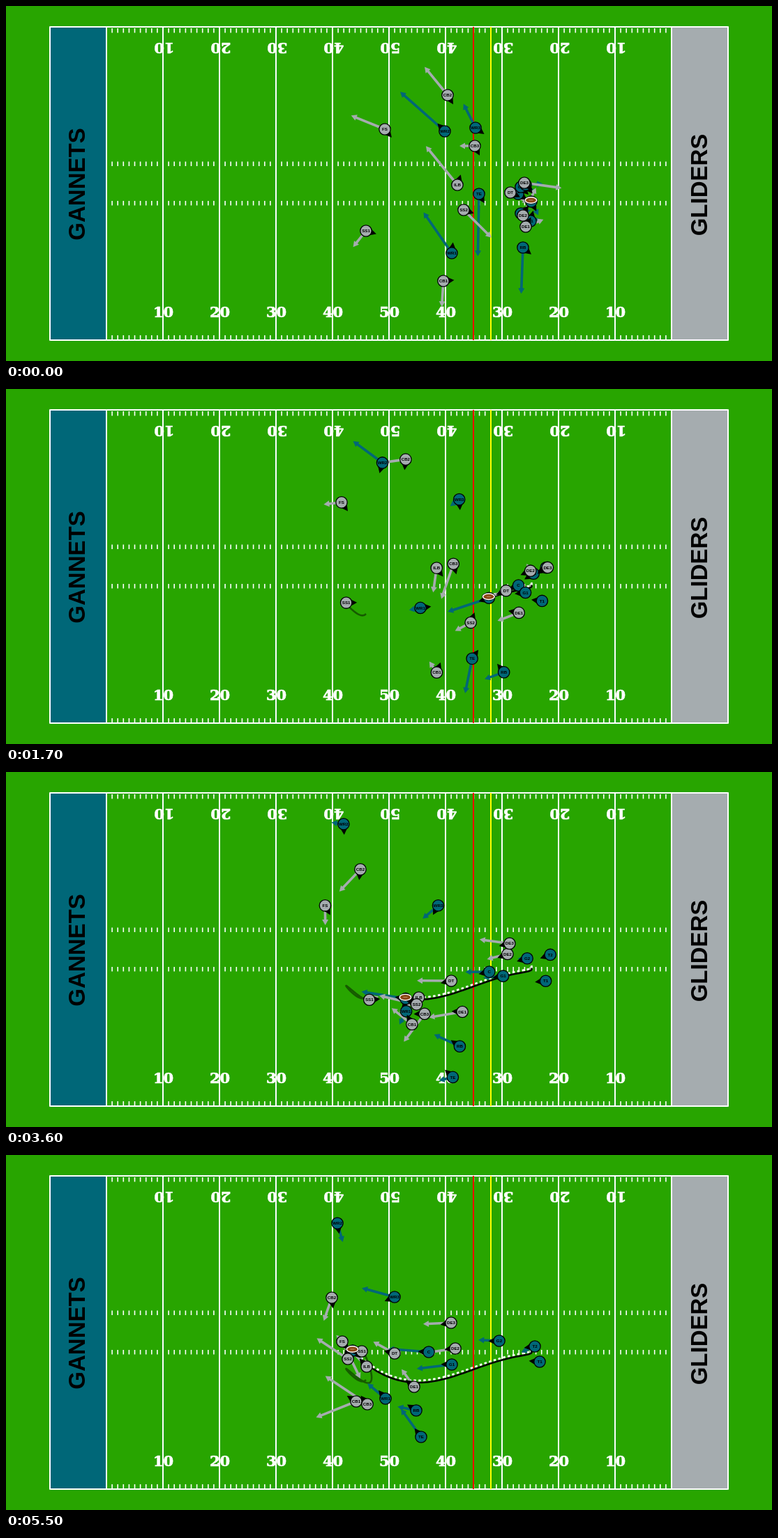
Animation, 1098 px wide and 510 px high, one loop 5600 ms. Source, as an HTML page with a canvas:

```html
<!DOCTYPE html>
<html lang="en">
<head>
<meta charset="utf-8">
<title>Football play</title>
<style>
html, body { margin: 0; height: 100%; overflow: hidden; background: #28a500 }
canvas { display: block }
</style>
</head>
<body>
<canvas id="stage" width="1098" height="510"></canvas>
<script>
const ctx = document.getElementById("stage").getContext("2d");
const LOOP = 5600, STEP = 100, PLAY = 5.5; // ms, ms, seconds
const TEAL = "#006778", SILVER = "#a5acaf", GRASS = "#28a500";
const SANS = "'Liberation Sans', Arial, sans-serif";
const players = [];

// A route is a smooth curve through a few points, evenly spaced in time.
function player(name, color, ...route) {
  const p = { name, color, route };
  players.push(p);
  return p;
}

player("C", TEAL, [734, 270], [717, 286], [606, 283]);
player("G1", TEAL, [738, 298], [732, 292], [639, 301]);
player("G2", TEAL, [738, 260], [755, 267], [707, 267]);
player("T1", TEAL, [752, 309], [773, 302], [765, 297]);
player("T2", TEAL, [745, 257], [781, 259], [758, 275]);
player("TE", TEAL, [678, 270], [655, 426], [595, 405]);
player("RB", TEAL, [741, 347], [710, 408], [648, 393], [588, 367]);
player("WR1", TEAL, [639, 355], [592, 315], [573, 345], [544, 350]);
player("WR2", TEAL, [629, 180], [503, 82], [475, 98]);
player("WR3", TEAL, [673, 175], [648, 160], [618, 193], [557, 204]);
const carrier =
player("QB", TEAL, [753, 281], [725, 291], [662, 311], [592, 327], [526, 307], [497, 281]);
player("ILB", SILVER, [647, 257], [619, 247], [609, 298], [575, 331], [517, 304]);
player("DT", SILVER, [723, 268], [713, 291], [635, 300], [557, 285]);
player("DE1", SILVER, [745, 317], [731, 323], [651, 345], [585, 333]);
player("DE2", SILVER, [741, 301], [751, 260], [717, 262], [644, 278]);
player("DE3", SILVER, [743, 254], [775, 256], [719, 246], [638, 241]);
player("CB1", SILVER, [627, 395], [616, 405], [580, 361], [502, 354]);
player("CB2", SILVER, [633, 128], [568, 102], [506, 142], [467, 205]);
player("CB3", SILVER, [672, 201], [639, 258], [598, 350], [518, 358]);
player("SS2", SILVER, [656, 293], [663, 337], [585, 333], [490, 293]);
const safety =
player("SS1", SILVER, [516, 323], [491, 312], [493, 311], [516, 327], [523, 311], [510, 282]);
player("FS", SILVER, [543, 177], [462, 173], [482, 268]);

// Neville interpolation along the route.
function position({ route }, time) {
  const s = time / PLAY * (route.length - 1);
  let points = route;
  for (let gap = 1; gap < route.length; gap++)
    points = points.slice(1).map((b, i) =>
      b.map((v, k) => points[i][k] + (v - points[i][k]) * (s - i) / gap));
  return points[0];
}

function pose(p, time) {
  const h = .02, [x, y] = position(p, time);
  const [x1, y1] = position(p, time - h), [x2, y2] = position(p, time + h);
  return { x, y, vx: (x2 - x1) / (2 * h), vy: (y2 - y1) / (2 * h) };
}

// Players look toward the ball, leaning into their own motion.
function facing({ x, y, vx, vy }, ball) {
  const dx = ball.x - x, dy = ball.y - y, pull = 60 / (Math.hypot(dx, dy) || 1);
  return Math.atan2(dy * pull + vy, dx * pull + vx);
}

function line(x1, y1, x2, y2, color, width) {
  ctx.strokeStyle = color;
  ctx.lineWidth = width;
  ctx.beginPath();
  ctx.moveTo(x1, y1);
  ctx.lineTo(x2, y2);
  ctx.stroke();
}

function text(label, x, y, angle, font, color, outline = 0) {
  ctx.save();
  ctx.translate(x, y);
  ctx.rotate(angle);
  ctx.font = font;
  ctx.fillStyle = ctx.strokeStyle = color;
  ctx.textAlign = "center";
  ctx.fillText(label, 0, 0);
  if (outline) {
    ctx.lineWidth = outline;
    ctx.strokeText(label, 0, 0);
  }
  ctx.restore();
}

// Triangle pointing along the angle, measured outward from x, y.
function pointer(x, y, angle, base, tip, half, color) {
  ctx.save();
  ctx.translate(x, y);
  ctx.rotate(angle);
  ctx.fillStyle = color;
  ctx.beginPath();
  ctx.moveTo(tip, 0);
  ctx.lineTo(base, half);
  ctx.lineTo(base, -half);
  ctx.fill();
  ctx.restore();
}

function drawField() {
  ctx.fillStyle = GRASS;
  ctx.fillRect(0, 0, 1098, 510);
  ctx.fillStyle = TEAL;
  ctx.fillRect(63, 30, 81, 450);
  ctx.fillStyle = SILVER;
  ctx.fillRect(954, 30, 81, 450);
  for (let yard = 1; yard < 100; yard++) {
    const x = 144 + yard * 8.1;
    for (const top of [32, 223.5, 280, 473]) line(x, top, x, top + 6.5, "#fff", 1.6);
  }
  for (let x = 144; x <= 954; x += 81) line(x, 30, x, 480, "#fff", 2);
  ctx.strokeRect(63, 30, 972, 450);
  for (let i = 1; i < 10; i++) {
    const x = 144 + i * 81, label = 10 * Math.min(i, 10 - i);
    const font = "bold 21px 'DejaVu Serif', serif";
    text(label, x + .5, 447, 0, font, "#fff", .7);
    text(label, x + 2, 53, Math.PI, font, "#fff", .7);
  }
  line(670, 30, 670, 480, "#f00", 2);
  line(695, 30, 695, 480, "#ff0", 2);
  text("GANNETS", 113, 256, -Math.PI / 2, "bold 33px " + SANS, "#000");
  text("GLIDERS", 1005, 257, -Math.PI / 2, "bold 33px " + SANS, "#000");
}

function drawTrail(who, time, color, width, dy = 0, dash = []) {
  ctx.beginPath();
  for (let k = 0; k <= Math.round(time * 10); k++) {
    const [x, y] = position(who, k / 10);
    ctx.lineTo(x, y + dy);
  }
  ctx.strokeStyle = color;
  ctx.lineWidth = width;
  ctx.lineJoin = "round";
  ctx.setLineDash(dash);
  ctx.stroke();
  ctx.setLineDash([]);
}

// The arrow spans one second of travel.
function drawArrow({ x, y, vx, vy }, color) {
  const length = Math.hypot(vx, vy), angle = Math.atan2(vy, vx);
  if (length < 6) return;
  const shaft = 1 - 6 / length;
  line(x, y, x + vx * shaft, y + vy * shaft, color, 3.6);
  pointer(x + vx, y + vy, angle, -7.5, .5, 4.5, color);
}

function drawPlayer({ name, color }, at, ball) {
  const { x, y } = at;
  pointer(x, y, facing(at, ball), 7, 15.5, 4.5, "#000");
  ctx.beginPath();
  ctx.arc(x, y, 8.2, 0, 7);
  ctx.fillStyle = color;
  ctx.fill();
  ctx.strokeStyle = "#000";
  ctx.lineWidth = 1.3;
  ctx.stroke();
  text(name, x, y + 2.1, 0, "bold 6.2px " + SANS, "#000");
}

function drawBall(x, y) {
  for (const [rx, ry, color] of [[9.6, 5.6, "#000"], [9, 5, "#fff"], [7.4, 3.6, "#8b4513"]]) {
    ctx.fillStyle = color;
    ctx.beginPath();
    ctx.ellipse(x, y, rx, ry, 0, 0, 7);
    ctx.fill();
  }
  line(x - 3, y, x + 3, y, "#c9a58a", .8);
}

function draw() {
  const time = Math.floor(performance.now() % LOOP / STEP) * STEP / 1000;
  const poses = players.map(p => pose(p, time));
  const ball = poses[players.indexOf(carrier)];
  drawField();
  drawTrail(safety, time, "rgba(0,0,0,.45)", 2.6);
  drawTrail(carrier, time, "#000", 2.6);
  drawTrail(carrier, time, "#fff", 2.8, -3, [3.5, 3.5]);
  players.forEach((p, i) => drawArrow(poses[i], p.color));
  players.forEach((p, i) => drawPlayer(p, poses[i], ball));
  drawBall(ball.x - .5, ball.y - 2);
  requestAnimationFrame(draw);
}
draw();
</script>
</body>
</html>
```
